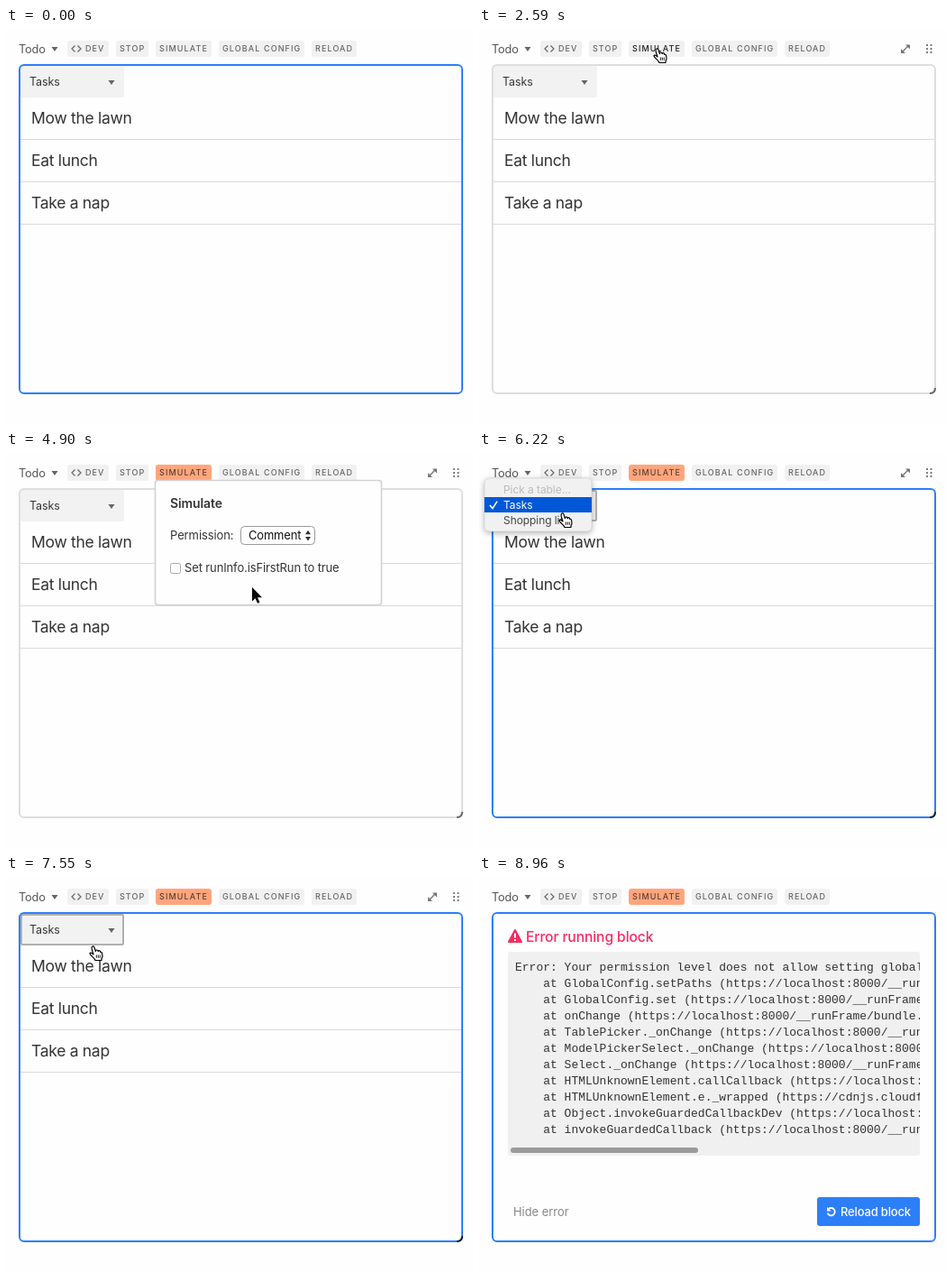
These frames come from a looping animation (518 px wide and 439 px high, 9.51 s). An HTML page:

```html
<!DOCTYPE html>
<html lang="en">
<head>
<meta charset="utf-8">
<title>Todo block</title>
<style>
html, body { margin: 0; width: 100%; height: 100%; overflow: hidden; background: #fefefe; }
svg { display: block; font-family: Inter, "Open Sans", sans-serif; fill: #333; }
text { white-space: pre; }
.mono { font-family: "Liberation Mono", "Courier New", monospace; }
.shadow { filter: drop-shadow(0 2px 3px rgba(0, 0, 0, .28)); }
</style>
</head>
<body>
<svg id="stage" width="518" height="439" viewBox="0 0 518 439"></svg>
<script>
const LOOP = 9510, BLUE = '#2d7ff9', PICK = '#0058d9';
const $ = id => document.getElementById(id);

// Markup helpers
const text = (x, y, size, str, attrs = '') =>
  `<text x="${x}" y="${y}" font-size="${size}" ${attrs}>${str}</text>`;
const rect = (x, y, w, h, r, attrs) =>
  `<rect x="${x}" y="${y}" width="${w}" height="${h}" rx="${r}" ${attrs}/>`;
const path = (d, attrs = '') => `<path d="${d}" ${attrs}/>`;
const group = (id, body, attrs = '') => `<g id="${id}" ${attrs}>${body}</g>`;
const line = (color, width) => `fill="none" stroke="${color}" stroke-width="${width}"`;
const track = (px, more = '') => `letter-spacing="${px}" ${more}`;

const button = (x, w, label, id = '', textX = x + 4) =>
  rect(x, 14, w, 18, 3, `id="${id}Bg" fill="#f1f1f1"`) +
  text(textX, 26.2, 9, label, track(1.1, `id="${id}Label" font-weight="500" fill="#666"`));

const menu = (id, x, y, w, h, top, pitch, size, items, checked) => {
  const rows = items.map((s, i) =>
    text(x + 21, top + pitch * i + 13, size, s, track(-.07, 'class="item"'))).join('');
  const cy = top + pitch * checked + 9;
  return group(id,
    rect(x, y, w, h, 5, 'fill="#f1f1f1" stroke="#ccc" stroke-width=".6" class="shadow"') +
    rect(x, top, w, pitch, 0, `class="bar" fill="${PICK}"`) + rows +
    path(`M${x + 6} ${cy}l3 3.6l5.2 -8`, `class="check" ${line('#333', 1.6)}`));
};

const header = text(14, 27.6, 12.8, 'Todo', track(-.2, 'fill="#555"')) +
  path('M50.5 21h7l-3.5 5z', 'fill="#666"') +
  button(68, 46, 'DEV', 'dev', 88) +
  path('M76.5 19.5l-3.5 3.5l3.5 3.5M79.5 19.5l3.5 3.5l-3.5 3.5', line('#666', 1.2)) +
  button(122, 36, 'STOP', 'stop') + button(166, 62, 'SIMULATE', 'sim') +
  button(236, 95, 'GLOBAL CONFIG', 'config') + button(339, 50, 'RELOAD', 'reload');

const dots = [18, 22, 26].map(y => rect(496, y, 2, 2, .5, '') + rect(500.5, y, 2, 2, .5, '')).join('');
const icons = group('icons',
  path('M473 18.5h5v5zM468 23v5h5z') + path('M469.5 26.5l7 -7', line('#777', 1.5)) + dots, 'fill="#777"');

const tasks = ['Mow the lawn', 'Eat lunch', 'Take a nap'].map((s, i) =>
  text(28, 106 + 47 * i, 17.5, s, track(-.3)) +
  path(`M16 ${123.5 + 47 * i}H505`, line('#dadada', 1))).join('');
const list = group('list',
  rect(16, 42, 115, 35, 2, 'fill="#f2f2f2"') +
  rect(17, 43, 113, 33, 1, `id="focus" ${line('#b0b0b0', 2)}`) +
  text(26, 64.3, 12.5, 'Tasks', track(-.1)) +
  path('M113.5 58h7l-3.5 5z', 'fill="#666"') + tasks);

const local = 'https://localhost:8000/__runFrame/bundle.js';
const stack = ['GlobalConfig.setPaths', 'GlobalConfig.set', 'onChange', 'TablePicker._onChange',
  'ModelPickerSelect._onChange', 'Select._onChange', 'HTMLUnknownElement.callCallback',
  'HTMLUnknownElement.e._wrapped', 'Object.invokeGuardedCallbackDev', 'invokeGuardedCallback'];
const trace = ['Error: Your permission level does not allow setting globalConfig',
  ...stack.map(s => `    at ${s} (${s.endsWith('wrapped') ? 'https://cdnjs.cloudflare.com/ajax' : local})`)];
const error = group('error',
  path('M40 60L47 73H33Z', 'fill="#f82b60" stroke="#f82b60" stroke-width="2" stroke-linejoin="round"') +
  path('M40 63.5v5M40 70v2', line('#fff', 2)) +
  text(52, 73, 15.7, 'Error running block', track(-.13, 'font-weight="500" fill="#f82b60"')) +
  rect(32, 84, 457, 226, 3, 'fill="#f0f0f0"') +
  `<g clip-path="url(#pre)" class="mono">${trace.map((s, i) => text(40, 105 + 18 * i, 13, s)).join('')}</g>` +
  rect(35, 301, 208, 6, 3, 'fill="#9b9b9b"') +
  text(38, 377, 13, 'Hide error', track(-.05, 'fill="#888"')) +
  rect(375, 356, 114, 32, 3, `fill="${BLUE}"`) +
  path('M387.6 369.2A4.2 4.2 0 1 1 386.6 373.6', line('#fff', 1.8)) + path('M386 367v4.6h4.6z', 'fill="#fff"') +
  text(401, 377, 13, 'Reload block', track(-.17, 'font-weight="500" fill="#fff"')));

const popup = group('popup',
  rect(165.5, 31.5, 251, 138, 3, 'fill="#fefefe" stroke="#d2d2d2" stroke-width="1.6"') +
  text(182, 62, 14, 'Simulate', track(-.1, 'font-weight="600"')) +
  text(182, 97, 13, 'Permission:', track(-.1)) +
  rect(260.5, 82.5, 82, 20, 4, 'fill="#fff" stroke="#999"') +
  text(269, 97, 13, '', track(-.2, 'id="value" style="fill:#111"')) +
  path('M332 91.2h6l-3 -4.4zM332 94h6l-3 4.4z') +
  rect(182.5, 123.5, 11, 11, 2, 'fill="#fff" stroke="#aaa"') +
  text(198, 133, 13, 'Set runInfo.isFirstRun to true', track(-.13)));

const arrow = path('M0 0V15.6L3.6 12.2L6 17.8L8.4 16.8L6 11.3H11Z',
  'id="arrow" fill="#000" stroke="#fff" stroke-width="1.6" paint-order="stroke"');
const hand = group('hand',
  path('M5 10L3.2 4.2Q2.6 1.6 4 1Q5.6 .6 6.2 2.6L7.4 6.6Q7.2 5 8.6 5Q9.8 5 10.2 6.6Q10.6 5.4 11.8 5.8' +
    'Q12.6 6.2 12.8 7.4Q14 6.8 14.5 8.6L15 11.5Q15 13.4 14 14.4V16.5H7Q6.6 15 4 12.6Q1 10 1 8.8Q1.6 7.6 3.2 8.6Z',
    'fill="#fff" stroke="#000" stroke-width="1.2" stroke-linejoin="round"') +
  path('M8.3 10.5v3.3M10.3 10.5v3.3M12.3 10.5v3.3', line('#000', .9)), 'transform="translate(-4 0)"');

$('stage').innerHTML = `<clipPath id="pre">${rect(32, 84, 457, 226, 3, '')}</clipPath>` +
  header + icons + list + error +
  rect(15, 41, 491, 364, 5, 'id="frame" fill="none" stroke-width="2"') +
  path('M500 405Q506 405 506 399', `id="corner" ${line('#666', 2)}`) + popup +
  menu('levels', 250, 79, 101, 81, 83, 18, 13, ['Create', 'Edit', 'Comment', 'Read'], 0) +
  menu('tables', 6, 29, 119, 59, 33, 17, 12, ['Pick a table...', 'Tasks', 'Shopping list'], 1) +
  group('cursor', arrow + hand);

// Pointer moves: start, end, number of steps, waypoints
const moves = [
  [350, 530, 3, [367, 315], [320, 272], [288, 242]],
  [1160, 2050, 11, [270, 225], [150, 130], [103, 92], [150, 40], [197, 22]],
  [2940, 3560, 8, [201, 28], [235, 58], [282, 88], [296, 94], [296, 94]],
  [3830, 4190, 5, [296, 97], [296, 106], [297, 117], [299, 125], [301, 131]],
  [4640, 5080, 6, [301, 131], [298, 133], [288, 141], [273, 150], [258, 174], [252, 183]],
  [5260, 5260, 1, [252, 184]],
  [5530, 6220, 9, [248, 182], [195, 142], [115, 85], [92, 67], [92, 67]],
  [6490, 6850, 5, [93, 68], [98, 76]],
  [7210, 7640, 6, [98, 76], [96, 77], [96, 77]],
  [8180, 8960, 10, [100, 90], [125, 210], [150, 340], [168, 415], [168, 415]],
];

function pointer(t) {
  const [start, end, n, ...pts] = moves.findLast(m => m[0] <= t) || moves[0];
  const step = Math.max(0, Math.min(n - 1, Math.floor((t - start) / ((end - start) / (n - 1 || 1)))));
  const f = step / (n - 1 || 1) * (pts.length - 1), i = Math.floor(f);
  const a = pts[i], b = pts[i + 1] || a;
  return a.map((v, k) => Math.round(v + (b[k] - v) * (f - i)));
}

const show = (id, on) => $(id).style.display = on ? '' : 'none';

function setMenu(id, open, row, checked, disabled) {
  show(id, open);
  if (!open) return;
  const items = [...$(id).querySelectorAll('.item')], bar = $(id).querySelector('.bar');
  items.forEach((el, i) => el.style.fill = i === row ? '#fff' : i === disabled ? '#bbb' : '#444');
  bar.style.display = row < 0 ? 'none' : '';
  bar.style.transform = `translateY(${row * bar.getAttribute('height')}px)`;
  $(id).querySelector('.check').style.stroke = row === checked ? '#fff' : '#333';
}

function draw() {
  const t = performance.now() % LOOP + 5;
  const during = (a, b) => t >= a && t < b;
  const [x, y] = pointer(t);
  const blue = !during(2590, 5530), orange = t >= 4730, hover = during(1880, 3030);
  const failed = t >= 7640, active = during(1700, 8780);
  const isHand = hover || during(5875, 6490) || during(7380, 8180);

  $('frame').style.stroke = blue ? BLUE : '#dedede';
  $('corner').style.stroke = blue ? '#123' : '#666';
  $('simBg').style.fill = orange ? '#ffa57d' : '#f1f1f1';
  $('simLabel').style.fill = orange ? '#5c4034' : hover ? '#222' : '#666';
  $('value').textContent = orange ? 'Comment' : 'Create';
  show('icons', active);
  show('corner', active);
  show('list', !failed);
  show('error', failed);
  show('focus', t >= 6130);
  show('popup', during(2680, 5530));
  setMenu('levels', during(3470, 4730), during(4640, 4730) ? -1 : Math.floor((y - 83) / 18), 0);
  setMenu('tables', during(6130, 7380), during(7210, 7296) ? -1 : y >= 68 ? 2 : 1, 1, 0);

  show('cursor', during(350, 8960));
  show('hand', isHand);
  show('arrow', !isHand);
  $('cursor').setAttribute('transform', `translate(${x} ${y})`);
  requestAnimationFrame(draw);
}
draw();
</script>
</body>
</html>
```
